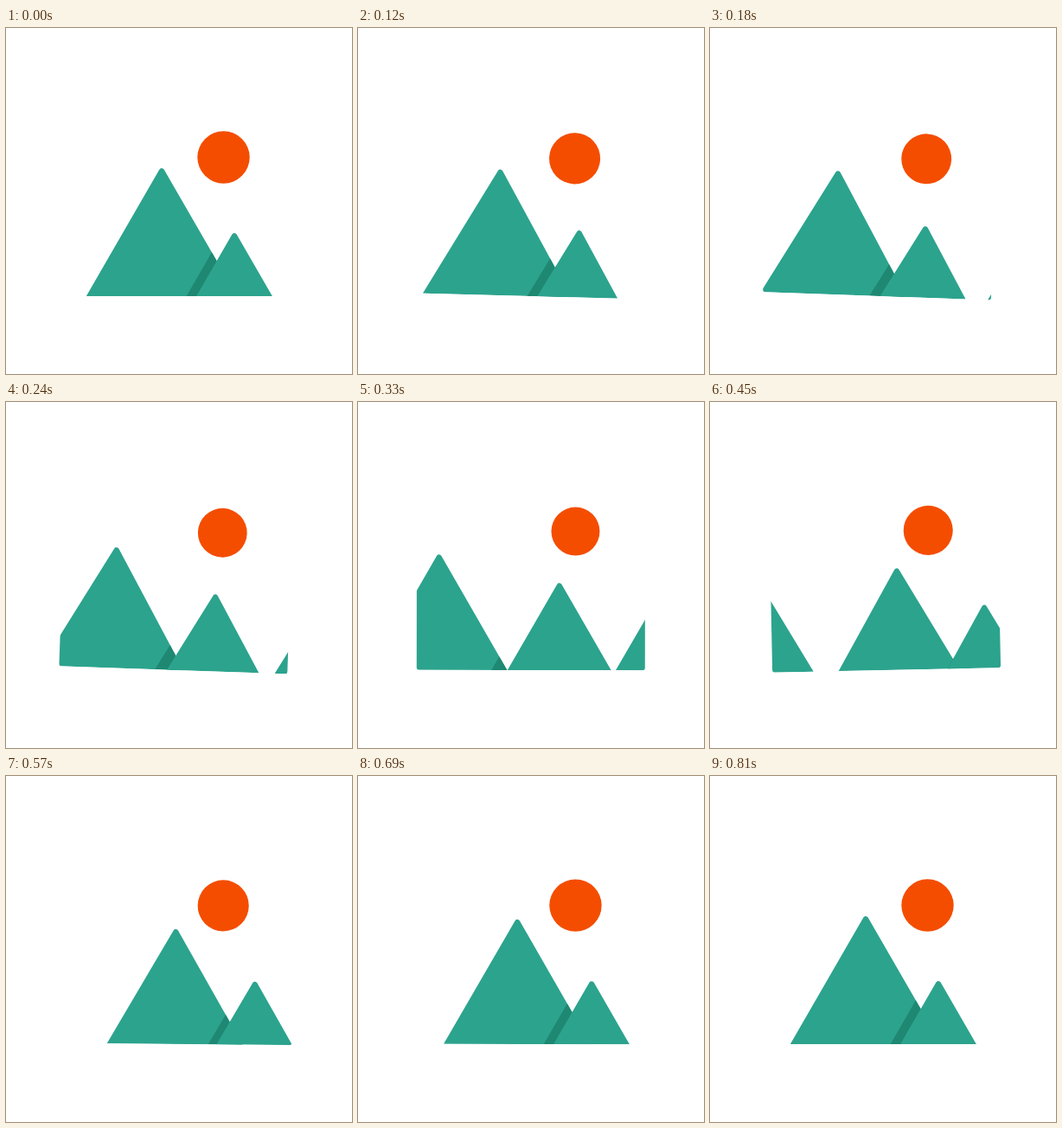
Recreate the animation shown at these times as an HTML page with a canvas. Size 400 px wide and 400 px high, loop 2870 ms.

```html
<!DOCTYPE html>
<html>
<head>
<meta charset="utf-8">
<style>
  html, body { margin: 0; height: 100%; overflow: hidden; background: #fff; }
  canvas { display: block; }
</style>
</head>
<body>
<canvas id="stage" width="400" height="400"></canvas>
<script>
const ctx = document.getElementById('stage').getContext('2d');
const LOOP = 2870, STEP = 30, MOVE = 800;
const BASE = 310, SLOPE = Math.tan(Math.PI / 6), TIP = 3;
const GREEN = '#2ca38d', SHADE = '#1f8872', SUN = '#f44d00';

// [time in ms, value] pairs, eased from one to the next
const TILT = [[0, 0], [180, 2.05], [220, 2.05], [420, -1.4], [570, 0.5], [740, 0]];
const RADIUS = [[0, 30.2], [330, 28], [700, 30.2]];

const clamp = v => Math.min(1, Math.max(0, v));
const smooth = v => v * v * (3 - 2 * v);
const mix = (a, b, p) => a + (b - a) * p;

function track(keys, t) {
  const i = keys.findIndex(k => k[0] > t);
  if (i < 0) return keys[keys.length - 1][1];
  const [t0, a] = keys[i - 1], [t1, b] = keys[i];
  return mix(a, b, smooth((t - t0) / (t1 - t0)));
}

// Triangle with a rounded tip; height is measured to the visible top
function mountain(x, height) {
  const full = height + TIP, half = full * SLOPE;
  const dx = TIP * Math.cos(Math.PI / 6), y = BASE - full + TIP * 1.5;
  return new Path2D(`M${x - half} ${BASE}L${x - dx} ${y}` +
    `A${TIP} ${TIP} 0 0 1 ${x + dx} ${y}L${x + half} ${BASE}Z`);
}

function fill(path, color) {
  ctx.fillStyle = color;
  ctx.fill(path);
}

// Shadow that a front mountain casts on the one behind it
function shadow(behind, x, height, width) {
  if (width <= 0) return;
  ctx.save();
  ctx.clip(behind);
  fill(mountain(x - width, height), SHADE);
  ctx.restore();
}

function draw(t) {
  const p = smooth(clamp(t / MOVE));
  ctx.clearRect(0, 0, 400, 400);
  ctx.save();
  ctx.translate(200, 114);
  ctx.rotate(track(TILT, t) * Math.PI / 180);
  ctx.translate(-200, -114);

  const card = new Path2D();
  card.roundRect(68, 88, 264, BASE - 88, 3);
  ctx.clip(card);

  const sun = new Path2D();
  sun.arc(251.5, 149.5, track(RADIUS, t), 0, 7);
  fill(sun, SUN);

  const leaving = mountain(mix(180, -53, p), mix(148, 109, p));
  const x = mix(264, 180, p), height = mix(73, 148, p);
  const growing = mountain(x, height);
  const nextX = mix(388, 264, p);

  fill(leaving, GREEN);
  shadow(leaving, x, height, Math.min(18.6, 11.5 + 52 * p * p));
  fill(growing, GREEN);
  shadow(growing, nextX, 73, 11.5 * (1 - (1 - clamp((p - 0.59) / 0.41)) ** 2.5));
  fill(mountain(nextX, 73), GREEN);
  ctx.restore();
}

const start = performance.now();
function tick() {
  const t = (performance.now() - start) % LOOP;
  draw(Math.floor(t / STEP) * STEP);
  requestAnimationFrame(tick);
}
tick();
</script>
</body>
</html>
```
